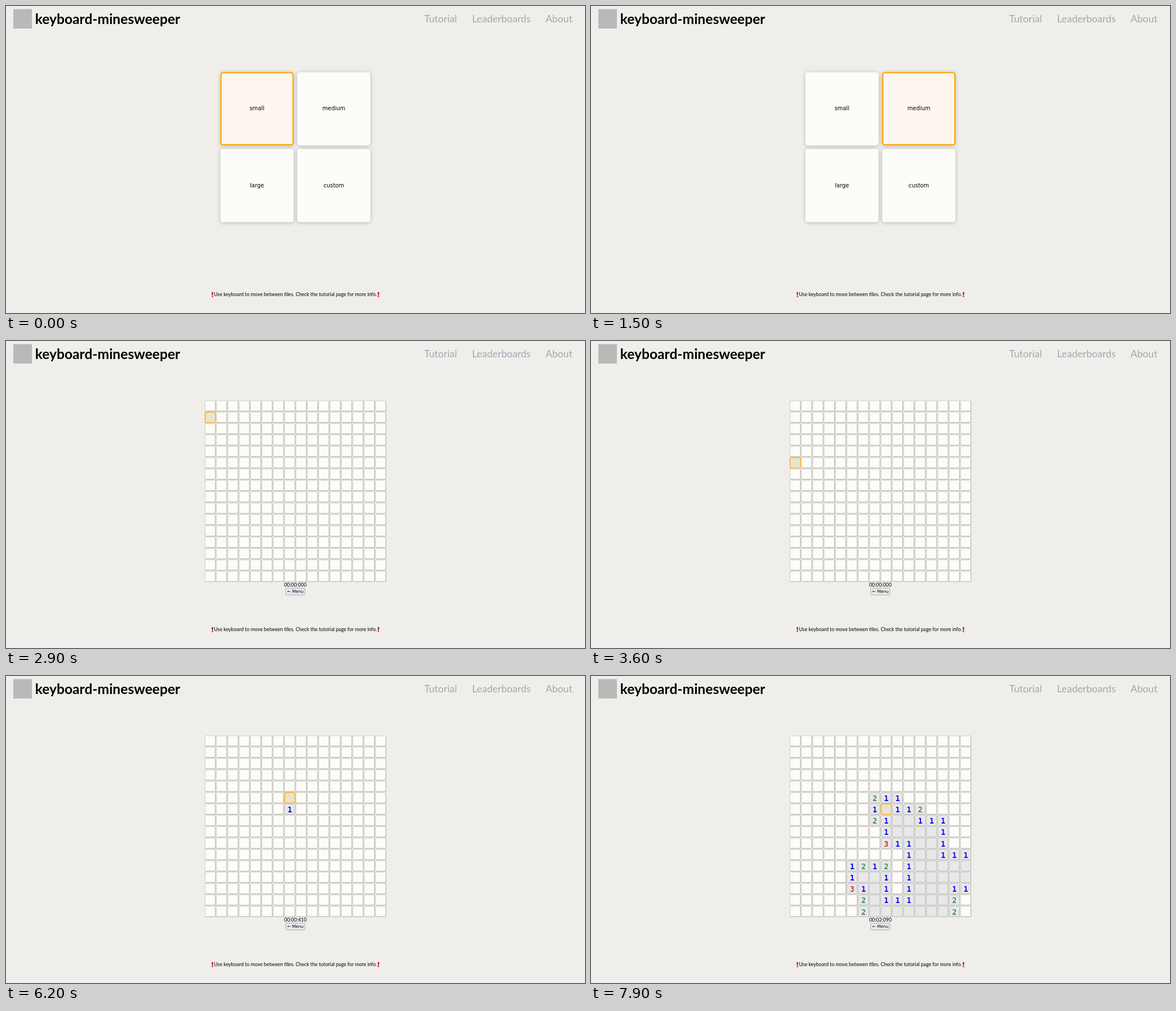
An HTML page that plays this animation: 1028x545 px, repeating every 8 s.

```html
<!DOCTYPE html>
<html lang="en">
<head>
<meta charset="utf-8">
<title>keyboard-minesweeper</title>
<style>
  html, body { margin: 0; width: 100%; height: 100%; overflow: hidden; background: #efeeea; }
  svg { display: block; width: 1028px; height: 545px; }
  text { font-family: Lato, sans-serif; font-size: 8.8px; text-anchor: middle; }
  .title { font-size: 24.6px; font-weight: 700; }
  .nav { font-size: 17.6px; fill: #a5a6b1; }
  .mark { fill: #be1931; }

  .tile rect { fill: #fdfcf8; filter: drop-shadow(.5px 1px 3px rgba(0, 0, 0, .24)); }
  .tile text { font: 9.9px "DejaVu Sans", sans-serif; }
  .tile .ring { fill: #fdf7f0; stroke: orange; stroke-width: 2.2; filter: none; visibility: hidden; }
  .tile.on .ring { visibility: inherit; }

  .cell rect { fill: #fdfcf8; }
  .cell path { fill: none; stroke: #cfcecb; }
  .cell .dark { stroke: #a9a9a7; }
  .cell text { font: 700 13.2px "DejaVu Sans Mono", monospace; }
  .cell.open rect { fill: #e8e8e8; }
  .cell.open path { stroke: #c3c3c2; }
  .cell.open .dark { stroke: #b4b4b3; }
  .cell.on rect { fill: #e8e4d0; stroke: #fbae22; stroke-width: 1.5; }
  .cell.on path { visibility: hidden; }
  .n1 { fill: #0000f5; }
  .n2 { fill: #35905a; }
  .n3 { fill: #e22f2f; }

  .button rect { fill: #e9e9ed; stroke: #8f8f9d; stroke-width: .7; }
  .button text { font: 7.33px "DejaVu Sans", sans-serif; }
</style>
</head>
<body>
<svg viewBox="0 0 1028 545">
  <defs>
    <g id="bang" class="mark">
      <path d="M-1.4 -3.6Q-1.4 -4.7 0 -4.7Q1.4 -4.7 1.4 -3.6L.8 1.1Q.7 1.6 0 1.6Q-.7 1.6 -.8 1.1Z"/>
      <circle cy="3.2" r="1.2"/>
    </g>
  </defs>
  <rect x="13" y="5.5" width="33" height="34.5" fill="#b9b9b9"/>
  <text class="title" x="180.5" y="32">keyboard-minesweeper</text>
  <text class="nav" x="771.5" y="29.3">Tutorial</text>
  <text class="nav" x="879.5" y="29.3">Leaderboards</text>
  <text class="nav" x="981.8" y="29.3">About</text>

  <g id="menu"></g>
  <g id="game">
    <g id="board"></g>
    <text id="timer" x="513.7" y="436.4"></text>
    <g class="button">
      <rect x="496.6" y="438.8" width="34.3" height="12" rx="2.2"/>
      <text x="513.8" y="447.4">← Menu</text>
    </g>
  </g>

  <use href="#bang" x="366.5" y="512.5"/>
  <text x="514" y="515.3">Use keyboard to move between tiles. Check the tutorial page for more info.</text>
  <use href="#bang" x="661.3" y="512.5"/>
</svg>
<script>
const LOOP = 8000, STEP = 100, SIZE = 16, PITCH = 20.18;
const GAME_START = 1900, CLOCK_START = 5800;
const byId = id => document.getElementById(id);
const menu = byId('menu'), game = byId('game'), board = byId('board'), timer = byId('timer');

// Rows 5 to 15 after the area opens; a dot is a closed cell.
const FIRST_ROW = 5;
const area = [
  '.......211......',
  '.......10112....',
  '.......2100111..',
  '........100001..',
  '........311001..',
  '..........100111',
  '.....1212.100000',
  '.....1001.100000',
  '.....3101.100011',
  '......201110002.',
  '......200000002.'
];

// [time, column, row]
const moves = [
  [1900, 0, 0], [2900, 0, 1], [3100, 0, 2], [3300, 0, 3], [3500, 0, 4], [3600, 0, 5],
  [3800, 0, 6], [4200, 1, 6], [4400, 2, 6], [4500, 3, 6], [4700, 4, 6], [4900, 5, 6],
  [5100, 6, 6], [5300, 7, 6], [6100, 7, 5], [6700, 8, 5], [7200, 8, 6]
];
const reveals = [[5800, 7, 6], [6400, 7, 5], [6900, 8, 5]];
const AREA_OPENS = 7500;

const digitAt = (col, row) => row < FIRST_ROW ? '.' : area[row - FIRST_ROW][col];

function openTime(col, row) {
  const hit = reveals.find(([, c, r]) => c === col && r === row);
  if (hit) return hit[0];
  return digitAt(col, row) === '.' ? Infinity : AREA_OPENS;
}

menu.innerHTML = ['small', 'medium', 'large', 'custom'].map((label, i) => {
  const x = 380.6 + i % 2 * 136.4, y = 117.4 + (i >> 1) * 136.3;
  return `<g class="tile" transform="translate(${x} ${y})">
    <rect width="130" height="130" rx="4.4"/>
    <rect class="ring" x="1" y="1" width="128" height="128" rx="3.6"/>
    <text x="65" y="68.1">${label}</text></g>`;
}).join('');

const cells = Array.from({ length: SIZE * SIZE }, (_, i) => {
  const col = i % SIZE, row = Math.floor(i / SIZE);
  return { col, row, opens: openTime(col, row), digit: digitAt(col, row) };
});
board.innerHTML = cells.map(({ col, row, digit }) =>
  `<g class="cell" transform="translate(${353 + col * PITCH} ${105.6 + row * PITCH})">
    <rect x=".5" y=".5" width="18.5" height="18.5" rx="1"/>
    <path d="M.5 18.6V.5H18.6"/><path class="dark" d="M.8 18.8H18.8V.8"/>
    <text class="n${digit}" x="9.8" y="15.3"></text></g>`).join('');
cells.forEach((cell, i) => {
  cell.node = board.children[i];
  cell.text = cell.node.querySelector('text');
});

function clockText(t) {
  const n = (t - CLOCK_START) / STEP;
  const ms = n < 0 ? 0 : Math.floor(Math.min(n * 100 + 10, n * 96 + 74) / 10) * 10;
  const pad = (v, len) => String(v).padStart(len, '0');
  return `00:${pad(Math.floor(ms / 1000), 2)}:${pad(ms % 1000, 3)}`;
}

function render(t) {
  const playing = t >= GAME_START;
  menu.style.visibility = playing ? 'hidden' : 'visible';
  game.style.visibility = playing ? 'visible' : 'hidden';

  const choice = t < 200 || (t >= 700 && t < 1500) ? 0 : 1;
  [...menu.children].forEach((tile, i) => tile.classList.toggle('on', i === choice));

  const [, col, row] = moves.filter(([at]) => at <= t).pop() || moves[0];
  for (const cell of cells) {
    const open = t >= cell.opens;
    cell.node.classList.toggle('open', open);
    cell.node.classList.toggle('on', cell.col === col && cell.row === row);
    cell.text.textContent = open && cell.digit > 0 ? cell.digit : '';
  }
  timer.textContent = clockText(t);
}

let shown = -1;
function frame() {
  const t = Math.floor(performance.now() % LOOP / STEP) * STEP;
  if (t !== shown) render(shown = t);
  requestAnimationFrame(frame);
}
frame();
</script>
</body>
</html>
```
